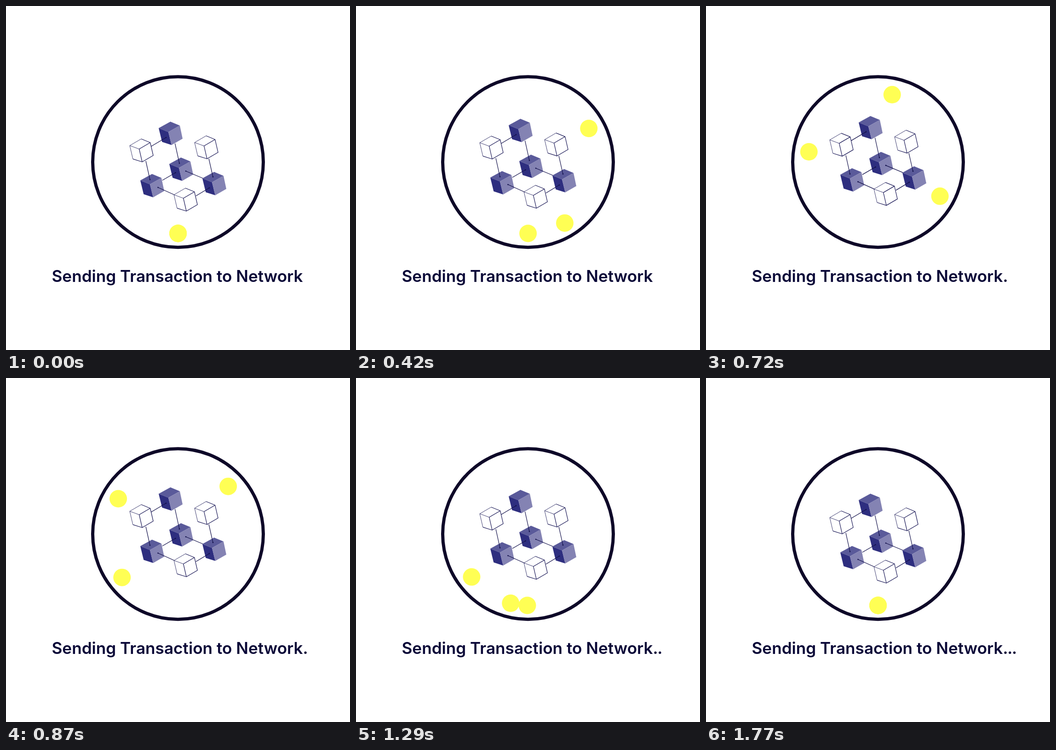
These frames come from a looping animation (748x748 px, 1.8 s). An HTML page:

```html
<!DOCTYPE html>
<html lang="en">
<head>
<meta charset="utf-8">
<title>Sending Transaction to Network</title>
<style>
  html, body { margin: 0; width: 100%; height: 100%; overflow: hidden; background: #fff; }
  svg { display: block; width: 100%; height: 100%; }
  text { font: 600 35.15px Inter, "Open Sans", sans-serif; font-optical-sizing: none; fill: #0a0838; }
  .links path { fill: none; stroke: #14124c; stroke-width: 1.2; }
  .links circle { fill: #14124c; }
  .wire { fill: none; stroke: #1c1a58; stroke-width: 1.2; stroke-linejoin: round; }
  .thin { fill: none; stroke: #1c1a58; stroke-width: .85; }
</style>
</head>
<body>
<svg viewBox="0 0 748 748">
  <defs>
    <g id="solid">
      <path fill="#5a5a9a" d="M-.5-25.5 20-17-5-3-26-11.5z"/>
      <path fill="#2e2e7f" d="M-26-11.5-5-3 2 25.2-18.7 18.6z"/>
      <path fill="#8483b3" d="M20-17 26 11.5 2 25.2-5-3z"/>
    </g>
    <g id="open">
      <path class="wire" d="M-.5-25 19-17 25.5 11 1.5 25-18.7 18.6M19-17-5-3 1.5 25"/>
      <path class="thin" d="M-.5-25-25.5-10.5-5-3M-25.5-10.5-18.7 18.6"/>
    </g>
  </defs>
  <circle cx="374" cy="339.3" r="185.5" fill="none" stroke="#0e0828" stroke-width="7"/>
  <g id="net"><g class="links"></g></g>
  <g id="coins" fill="#ffff54"></g>
  <text x="99.5" y="600.3">Sending Transaction to Network<tspan id="dots" letter-spacing="-1.5"></tspan></text>
</svg>
<script>
const LOOP = 1800, STEP = 30;
const $ = id => document.getElementById(id);
const net = $('net'), coins = $('coins'), dots = $('dots');
const links = net.firstElementChild;

function add(parent, tag, attrs) {
  const el = document.createElementNS('http://www.w3.org/2000/svg', tag);
  for (const key in attrs) el.setAttribute(key, attrs[key]);
  return parent.appendChild(el);
}

const cubes = {
  solid: [[358, 277], [381, 355], [318, 390.7], [453, 386.3]],
  open: [[294.6, 314], [435.6, 307.3], [390.7, 421]]
};
for (const kind in cubes)
  for (const [x, y] of cubes[kind]) add(net, 'use', { href: '#' + kind, x, y });
net.append(links);

// Each link runs from a cube's edge to a pin on a solid face.
const wires = [
  [316, 305, 348, 286], [304, 337, 313, 377.5], [367.5, 299, 377, 342],
  [428, 374.5, 391, 359], [340, 379, 368.5, 362.5], [441, 332, 450, 371.5],
  [366, 410.5, 330.5, 394.5], [413, 413, 442, 395.5]
];
for (const [x1, y1, x2, y2] of wires) {
  add(links, 'path', { d: `M${x1} ${y1}L${x2} ${y2}` });
  add(links, 'circle', { cx: x2, cy: y2, r: 1.3 });
}

const delays = [-3, 203, 419];
const balls = delays.map(() => add(coins, 'circle', { r: 19 }));

const smooth = s => s * s * (3 - 2 * s);

// cubic-bezier(.333, 0, .4, 1)
function ease(x) {
  if (x <= 0 || x >= 1) return x <= 0 ? 0 : 1;
  let lo = 0, hi = 1;
  for (let i = 0; i < 24; i++) {
    const s = (lo + hi) / 2, r = 1 - s;
    if (s * (r * r + 1.2 * s * r + s * s) < x) lo = s; else hi = s;
  }
  return smooth(lo);
}

function draw(now) {
  const t = Math.floor(now % LOOP / STEP) * STEP;
  const rise = 13.8 * smooth(1 - Math.abs(t / 900 - 1));
  net.setAttribute('transform', `translate(0 ${-rise})`);
  balls.forEach((ball, i) => {
    const a = 2 * Math.PI * ease((t - delays[i]) / 1350);
    ball.setAttribute('cx', 374.1 + 152.4 * Math.sin(a));
    ball.setAttribute('cy', 342.1 + 152.4 * Math.cos(a));
  });
  dots.textContent = '.'.repeat(Math.floor(t / 450));
}

const start = performance.now();
function tick() {
  draw(performance.now() - start);
  requestAnimationFrame(tick);
}
tick();
</script>
</body>
</html>
```
